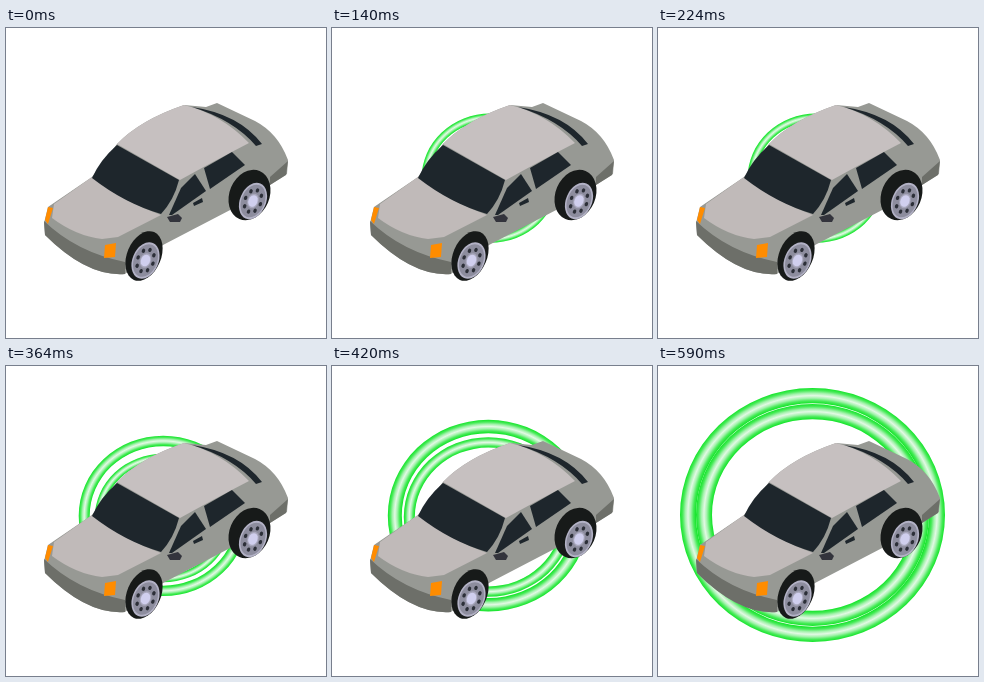
Write an HTML page with a canvas that moves like this. It is 320 by 310 pixels and loops after 690 ms.

```html
<!DOCTYPE html>
<html>
<head>
<meta charset="utf-8">
<style>
html, body { margin: 0; width: 100%; height: 100%; overflow: hidden; background: #fff; }
canvas { display: block; }
</style>
</head>
<body>
<canvas id="stage" width="320" height="310"></canvas>
<script>
const ctx = document.getElementById('stage').getContext('2d');
const LOOP = 690;
const changes = [140, 280, 420, 510, 590];

function fillPath(color, d) {
  ctx.fillStyle = color;
  ctx.fill(new Path2D(d));
}

function disc(x, y, rx, ry, color) {
  ctx.beginPath();
  ctx.ellipse(x, y, rx, ry, 0, 0, 7);
  ctx.fillStyle = color;
  ctx.fill();
}

// A glossy ring, pale along the middle of its width
function tube(x, y, rx, ry, width) {
  const inner = 1 - width / rx;
  const paint = ctx.createRadialGradient(0, 0, inner, 0, 0, 1);
  ['#12e428', '#48eb59', '#a5f2ae', '#e2f9e4', '#a5f2ae', '#48eb59', '#12e428']
    .forEach((color, i) => paint.addColorStop(i / 6, color));
  ctx.save();
  ctx.translate(x, y);
  ctx.scale(rx, ry);
  ctx.beginPath();
  ctx.arc(0, 0, 1, 0, 7);
  ctx.arc(0, 0, inner, 0, 7);
  ctx.fillStyle = paint;
  ctx.fill('evenodd');
  ctx.restore();
}

// Rings widen evenly; from the second step an inner one follows the outer
function rings(n) {
  if (!n) return;
  const left = 5 - n;
  const x = 154.5 + .9 * left, y = 149 + .3 * left;
  const rx = 52.5 + 16 * n, ry = 49 + 15.6 * n;
  const width = k => Math.min(16, 5 + 3 * k);
  if (n > 1) tube(x, y + .7 * left, rx - 16, ry - 16, width(n - 1));
  tube(x, y, rx, ry, width(n));
}

function wheel(x, y, tyreX, tyreY, tyreWidth) {
  ctx.save();
  ctx.translate(tyreX, tyreY);
  ctx.rotate(.4);
  disc(0, 0, tyreWidth, 26, '#171a19');
  ctx.restore();
  ctx.save();
  ctx.translate(x, y);
  ctx.rotate(.4);
  disc(0, 0, 13, 19, '#b3b2c6');
  disc(0, 0, 11.5, 17, '#8d8d9e');
  for (let i = 0; i < 8; i++) {
    const a = i * Math.PI / 4;
    disc(8 * Math.cos(a), 11.5 * Math.sin(a), 1.7, 2.2, '#2c2f38');
  }
  disc(0, 0, 5.5, 7.5, '#a9a8bd');
  disc(0, 0, 4.5, 6, '#d0cfee');
  ctx.restore();
}

function car() {
  const dark = '#6d6f69', glass = '#1e262c', lamp = '#ff8c00';
  // Body and bumpers
  fillPath('#979994', 'M38 195L42 179 86 149 111 116Q134 92 178 77L200 79 211 75 249 93Q272 105 282 132L281 146 228 180 157 217 119 246Q81 249 39 207Z');
  fillPath(dark, 'M264 149L282 133 280 147 264 157Z');
  fillPath(dark, 'M38 193Q70 224 119 234L119 246Q81 249 39 207Z');
  // Bonnet and roof
  fillPath('#c0bab9', 'M48 176L86 149Q118 174 155 187L112 209 96 211Q70 208 46 190Z');
  fillPath('#c6c0c0', 'M111 116Q134 92 178 77Q215 86 243 115Q210 132 174 152Z');
  // Windows
  fillPath(glass, 'M111 117L173 152Q168 172 155 186Q118 175 86 150Q94 132 111 117Z');
  fillPath(glass, 'M186 79Q233 86 256 116L250 118Q228 92 186 79Z');
  fillPath(glass, 'M189 146L200 163 166 187 163 187 175 160Z');
  fillPath(glass, 'M198 140L226 124 239 137 204 161Z');
  // Lamps, handle and mirror
  fillPath(lamp, 'M42 179L47 180 42 196 39 192Z');
  fillPath(lamp, 'M99 217L110 215 109 229 98 230Z');
  fillPath(glass, 'M187 175L196 170 197 174 188 178Z');
  fillPath('#33343c', 'M161 189L172 186 176 190 174 194 164 194Z');
  wheel(139.5, 232.5, 138, 228, 17);
  wheel(247, 173, 243.5, 167, 20);
}

function draw() {
  const t = performance.now() % LOOP;
  ctx.fillStyle = '#fff';
  ctx.fillRect(0, 0, 320, 310);
  rings(changes.filter(at => t >= at).length);
  car();
  requestAnimationFrame(draw);
}
draw();
</script>
</body>
</html>
```
